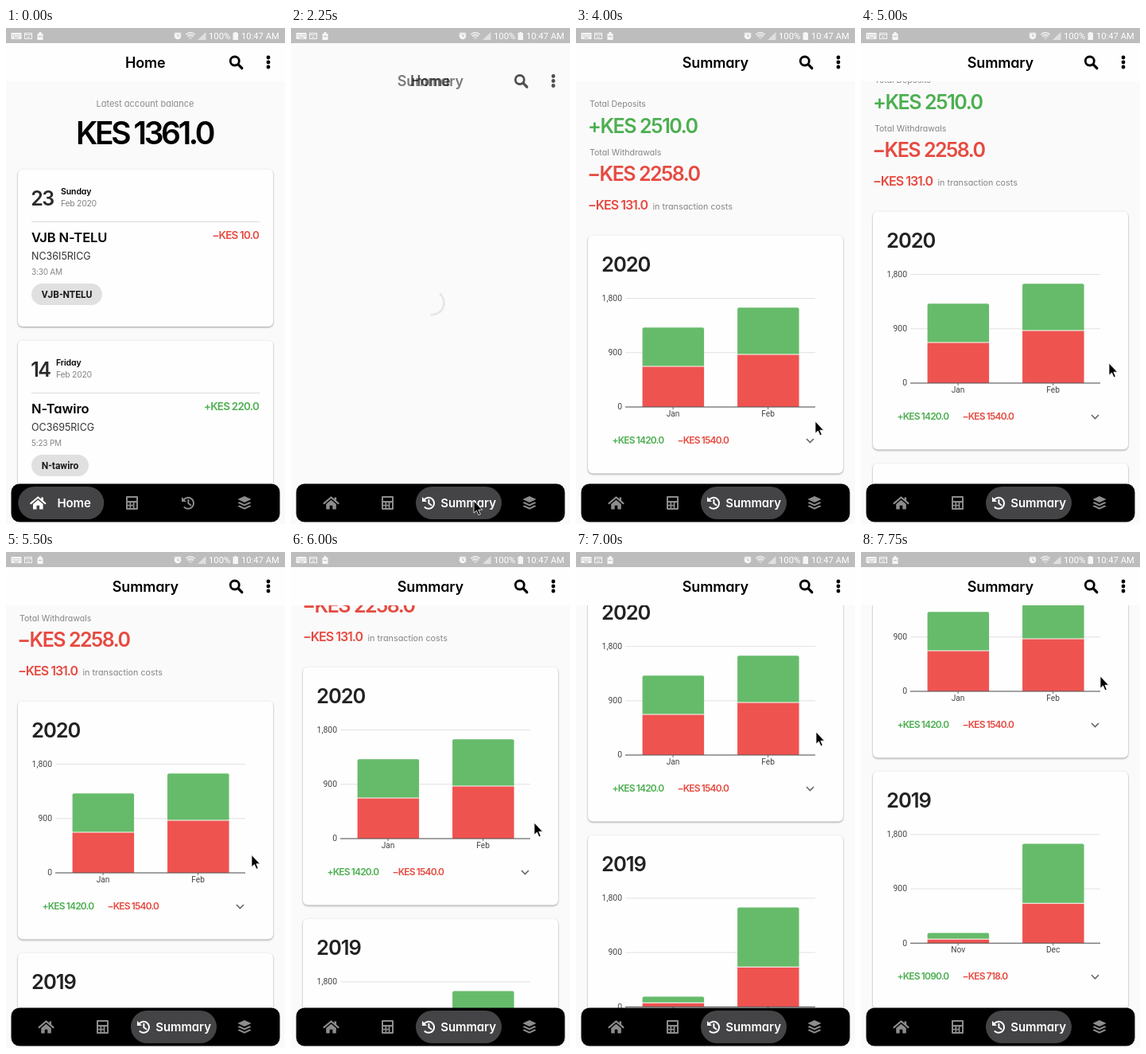
Write an HTML page that moves like this. It is 351x623 px and loops after 8000 ms.

```html
<!DOCTYPE html>
<html lang="en">
<head>
<meta charset="utf-8">
<title>Wallet summary</title>
<style>
  html, body { margin: 0; width: 100%; height: 100%; overflow: hidden; background: #fafafa; }
  svg { display: block; width: 100vw; height: 100vh; }
  text { font-family: Inter, "Open Sans", sans-serif; font-optical-sizing: none; font-feature-settings: "cv11"; white-space: pre; }
  .m { font-weight: 600; }
  .r { font-family: Roboto, sans-serif; }
  .b { font-family: Roboto, sans-serif; font-weight: 700; }
  .card { fill: #fefefe; filter: drop-shadow(0 1px 1.3px rgba(0, 0, 0, .38)); }
</style>
</head>
<body>
<svg id="stage" viewBox="0 0 351 623">
  <defs>
    <clipPath id="view"><rect y="67" width="351" height="506"/></clipPath>
    <g id="house">
      <path d="M-9 .6 0-7 9 .6" fill="none" stroke="currentColor" stroke-width="2.2" stroke-linecap="round" stroke-linejoin="round"/>
      <path d="M4-7h2.6v5L4-4ZM-6.3 1.6 0-3.7 6.3 1.6V8H1.8V3.2h-3.6V8h-4.5Z" fill="currentColor"/>
    </g>
    <path id="calc" fill="currentColor" fill-rule="evenodd"
      d="M-6.500-8.500h13q1 0 1 1v15q0 1-1 1h-13q-1 0-1-1v-15q0-1 1-1ZM-5.500-6.500v4h11v-4ZM-5.500-.2v2.500h2.500v-2.500ZM-1.300-.2v2.500h2.500v-2.500ZM-5.500 4v2.500h2.500V4ZM-1.300 4v2.500h2.500V4ZM3-.2v6.700h2.500V-.2Z"/>
    <g id="past" fill="none" stroke="currentColor" stroke-width="2">
      <path d="M-5.6-3.8A7 7 0 1 1-4.6 5.6" stroke-linecap="round"/>
      <path d="M.4-3.8V.6L3.4 2.8" stroke-linecap="round"/>
      <path d="M-8-7.6V-1.6h6Z" fill="currentColor" stroke="none"/>
    </g>
    <g id="stack" fill="currentColor">
      <path d="M0-8.5 8.6-4.4 0-.4-8.6-4.4Z"/>
      <path d="M-8.6-.1-6.3-1.2 0 1.7 6.3-1.2 8.6-.1 0 4Z"/>
      <path d="M-8.6 4.2-6.3 3.1 0 6 6.3 3.1 8.6 4.2 0 8.3Z"/>
    </g>
  </defs>

  <g clip-path="url(#view)">
    <g id="home"></g>
    <g id="summary"></g>
  </g>
  <path id="spinner" d="M187 333.500A15 15 0 0 1 175.500 360" fill="none" stroke="#e6e6e6" stroke-width="2.600"/>
  <rect id="bar" y="19" width="351" height="48" fill="#fefefe"/>
  <g id="head">
    <g id="titles"></g>
    <g id="tools">
      <circle cx="287.800" cy="41.500" r="5.500" fill="none" stroke="#000" stroke-width="2.800"/>
      <path d="M292 45.700 296.800 50.500" stroke="#000" stroke-width="3.200" stroke-linecap="round"/>
      <g id="dots"></g>
    </g>
  </g>
  <g id="status"></g>
  <g id="nav">
    <rect x="6.500" y="572.500" width="338" height="48" rx="10.500"/>
    <g id="navHome"></g>
    <g id="navSum"></g>
  </g>
  <path id="cursor" d="M0 0V15.200L3.500 12 6 17.800 8.300 16.800 5.900 11.200H10.600Z" stroke="#fff" stroke-width=".8"/>
</svg>
<script>
const LOOP = 8000, STEP = 250, BASE = 476;
const GREEN = '#4caf50', RED = '#e64a40', GRAY = '#858585', DIM = '#8c8c8c';
const el = id => document.getElementById(id);
const put = (id, html) => { el(id).innerHTML = html; };
const show = (id, on) => { el(id).style.display = on ? '' : 'none'; };

function text(s, x, y, size, o = {}) {
  return `<text x="${x}" y="${y}" font-size="${size}" class="${o.c || ''}" fill="${o.fill || '#000'}"` +
    ` letter-spacing="${o.ls || 0}" text-anchor="${o.at || 'start'}">${s}</text>`;
}
const rect = (x, y, w, h, fill, rx = 0) =>
  `<rect x="${x}" y="${y}" width="${w}" height="${h}" rx="${rx}" fill="${fill}"/>`;
const line = (x1, x2, y, color) => `<path d="M${x1} ${y}H${x2}" stroke="${color}"/>`;
const icon = (id, x, color) => `<use href="#${id}" transform="translate(${x} 596.5)" color="${color}"/>`;
const at = (y, html) => `<g transform="translate(0 ${y})">${html}</g>`;
const card = (y, h) => `<rect class="card" x="15" y="${y}" width="321" height="${h}" rx="6"/>`;

// Home page
function entry(e) {
  return card(177.5, 197.5) +
    text(e.day, 31.3, 223, 25, { c: 'm', fill: '#2b2b2b', ls: -1.5 }) +
    text(e.week, e.x, 209, 10.5, { c: 'm', ls: -.1 }) +
    text('Feb 2020', e.x, 224, 10.5, { fill: GRAY, ls: -.3 }) +
    line(32, 319, 243.5, '#dcdcdc') +
    text(e.name, 32, 269, 16.5, { c: 'm', ls: -.1 }) +
    text(e.sum, 318, 265, 13.5, { c: 'm', fill: e.color, ls: -.8, at: 'end' }) +
    text(e.code, 32, 291, 12.5, { fill: '#333' }) +
    text(e.time, 32, 309.5, 10, { fill: GRAY, ls: -.2 }) +
    rect(32, 321, e.chipW, 27, '#e0e0e0', 13.5) +
    text(e.chip, 32 + e.chipW / 2, 339, 12, { c: 'b', fill: '#1c1c1c', at: 'middle' });
}

put('home',
  text('Latest account balance', 175, 99, 11, { fill: '#8a8a8a', at: 'middle' }) +
  text('KES 1361.0', 174, 146, 39, { c: 'm', ls: -3.4, at: 'middle' }) +
  entry({ day: '23', week: 'Sunday', x: 69, name: 'VJB N-TELU', sum: '−KES 10.0', color: RED,
    code: 'NC36I5RICG', time: '3:30 AM', chip: 'VJB-NTELU', chipW: 89 }) +
  at(215, entry({ day: '14', week: 'Friday', x: 63, name: 'N-Tawiro', sum: '+KES 220.0', color: GREEN,
    code: 'OC3695RICG', time: '5:23 PM', chip: 'N-tawiro', chipW: 72 })));

// Summary page
function column(x, label, top, split) {
  const y = BASE - top, cut = BASE - split;
  return `<g class="grow">
    <path d="M${x} ${cut - .5}V${y + 2}q0-2 2-2h73.500q2 0 2 2V${cut - .5}Z" fill="#66bb6a"/>
    ${rect(x, cut + .5, 77.5, split - .5, '#ef5350')}</g>` +
    `<path d="M${x + 38.5} ${BASE}v3" stroke="#666"/>` +
    text(label, x + 38.5, 488, 10.2, { c: 'r', fill: '#444', at: 'middle' });
}

function year(name, cols, gain, loss) {
  const grid = ['0', '900', '1,800'];
  const sum = { c: 'm', ls: -.85 };
  return card(260.5, 299) +
    text(name, 32, 305.5, 25.5, { c: 'm', fill: '#222', ls: -1 }) +
    grid.map((s, i) => line(62, 301, BASE - i * 68.2, '#e2e2e2') +
      text(s, 58, BASE - i * 68.2 + 3.4, 10.4, { c: 'r', fill: '#444', at: 'end' })).join('') +
    cols.map((c, i) => column(83.6 + i * 119.5, ...c)).join('') +
    line(62, 301, BASE, '#555') +
    text(gain, 45.5, 521.5, 12, { ...sum, fill: GREEN }) +
    text(loss, 127.5, 521.5, 12, { ...sum, fill: RED }) +
    '<path d="M290 516 294.500 520.500 299 516" fill="none" stroke="#666" stroke-width="1.600"/>';
}

put('summary',
  text('Total Deposits', 17, 98.5, 10.5, { fill: GRAY }) +
  text('+KES 2510.0', 15, 131.5, 25, { c: 'm', fill: GREEN, ls: -1.4 }) +
  text('Total Withdrawals', 17, 159.5, 10.6, { fill: GRAY }) +
  text('−KES 2258.0', 14.3, 191.5, 25, { c: 'm', fill: RED, ls: -1.5 }) +
  text('−KES 131.0', 15, 228, 16, { c: 'm', fill: RED, ls: -1 }) +
  text('in transaction costs', 96.5, 228, 10.8, { fill: GRAY }) +
  year('2020', [['Jan', 99.7, 51], ['Feb', 124.7, 66]], '+KES 1420.0', '−KES 1540.0') +
  at(316.3, year('2019', [['Nov', 12.7, 5], ['Dec', 124.7, 50]], '+KES 1090.0', '−KES 718.0')));

// Header, status bar, navigation
put('titles', ['Home', 'Summary'].map(s =>
  `<g id="title${s}">${text(s, 175.3, 49.5, 18, { c: 'm', ls: -.2, at: 'middle' })}</g>`).join(''));
put('dots', [37, 43, 49].map(y => `<circle cx="330" cy="${y}" r="2.400"/>`).join(''));

put('status', rect(0, 0, 351, 19, '#bdbdbd') + `
  <g opacity=".85">
  <g fill="#fff">
    <rect x="6.500" y="6" width="13" height="8" rx="1"/>
    <path d="M241 15 251.500 5V15Z" opacity=".6"/>
    <path d="M39.500 7h2V5h3v2h2v8h-7ZM285.500 6h2V5h2.500v1h2v9h-6.500Z"/>
    <circle cx="216" cy="10" r="4.300"/>
    <path d="M232 15 226 7.500Q232 3 238 7.500Z" opacity=".35"/>
  </g>
  <g fill="none" stroke="#bdbdbd">
    <path d="M8 8.500h10M8 10.500h10" stroke-dasharray="1.200 1"/><path d="M10 12.500h6M216 7.500V10.500h2M41 10.500h4"/>
  </g>
  <g fill="none" stroke="#fff">
    <rect x="23.500" y="6.500" width="9" height="7"/><path d="M24 8.500h8M26 11.500h4M211.500 7.500l2-2M220.500 7.500l-2-2"/>
    <path d="M226 8Q232 3 238 8M228 10.500Q232 7 236 10.500"/>
  </g></g>` +
  text('100%', 255, 14, 11.3, { c: 'r', fill: '#fff' }) +
  text('10:47 AM', 296, 14, 11.2, { c: 'r', fill: '#fff' }));

const pill = (x, id, iconX, label, labelX) => rect(x, 576, 108, 41, '#444446', 20.5) + icon(id, iconX, '#fff') +
  text(label, labelX, 602, 15, { c: 'm', fill: '#fff', ls: -.1 });
put('navHome', pill(15.3, 'house', 40.3, 'Home', 64.5) +
  icon('calc', 158.5, DIM) + icon('past', 229, DIM) + icon('stack', 300, DIM));
put('navSum', icon('house', 50.5, DIM) + icon('calc', 121.5, DIM) +
  pill(157, 'past', 173, 'Summary', 188.3) + icon('stack', 300, DIM));

// Motion: time, pointer x, pointer y, scroll
const path = [
  [750, 201, 613, 0], [1000, 219, 600, 0], [1250, 230, 594, 0], [2750, 230, 594, 0],
  [3250, 226, 573, 0], [4000, 301, 494, 0], [4500, 309, 452, 0], [4750, 311, 443, 8],
  [5000, 312, 421, 30], [6000, 306, 340, 116], [7000, 302, 226, 221], [7750, 301, 156, 301]
];

function sample(t) {
  const i = path.findIndex(p => p[0] > t);
  if (i < 0) return path[path.length - 1];
  if (i === 0) return path[0];
  const a = path[i - 1], b = path[i], k = (t - a[0]) / (b[0] - a[0]);
  return a.map((v, j) => v + (b[j] - v) * k);
}

const bars = document.querySelectorAll('.grow');

function draw(now) {
  const t = Math.floor(now % LOOP / STEP) * STEP;
  const home = t < 2250, loading = t === 2250, done = t > 2250;
  const [, x, y, scroll] = sample(t);

  show('home', home);
  show('summary', done);
  show('spinner', loading);
  show('bar', !loading);
  show('navHome', home);
  show('navSum', !home);
  el('titleHome').style.opacity = home ? 1 : loading ? .62 : 0;
  el('titleSummary').style.opacity = done ? 1 : loading ? .5 : 0;
  el('tools').style.opacity = loading ? .68 : 1;
  el('head').setAttribute('transform', `translate(0 ${loading ? 23.5 : 0})`);
  el('summary').setAttribute('transform', `translate(0 ${-Math.round(scroll)})`);

  const k = Math.min(1, Math.max(0, (t - 2400) / 350)), grow = 1 - (1 - k) ** 3;
  bars.forEach(b => b.setAttribute('transform', `translate(0 ${BASE * (1 - grow)}) scale(1 ${grow})`));

  show('cursor', t >= 750);
  el('cursor').setAttribute('transform', `translate(${x} ${y})`);
}

const start = performance.now();
function tick() {
  draw(performance.now() - start);
  requestAnimationFrame(tick);
}
tick();
</script>
</body>
</html>
```
